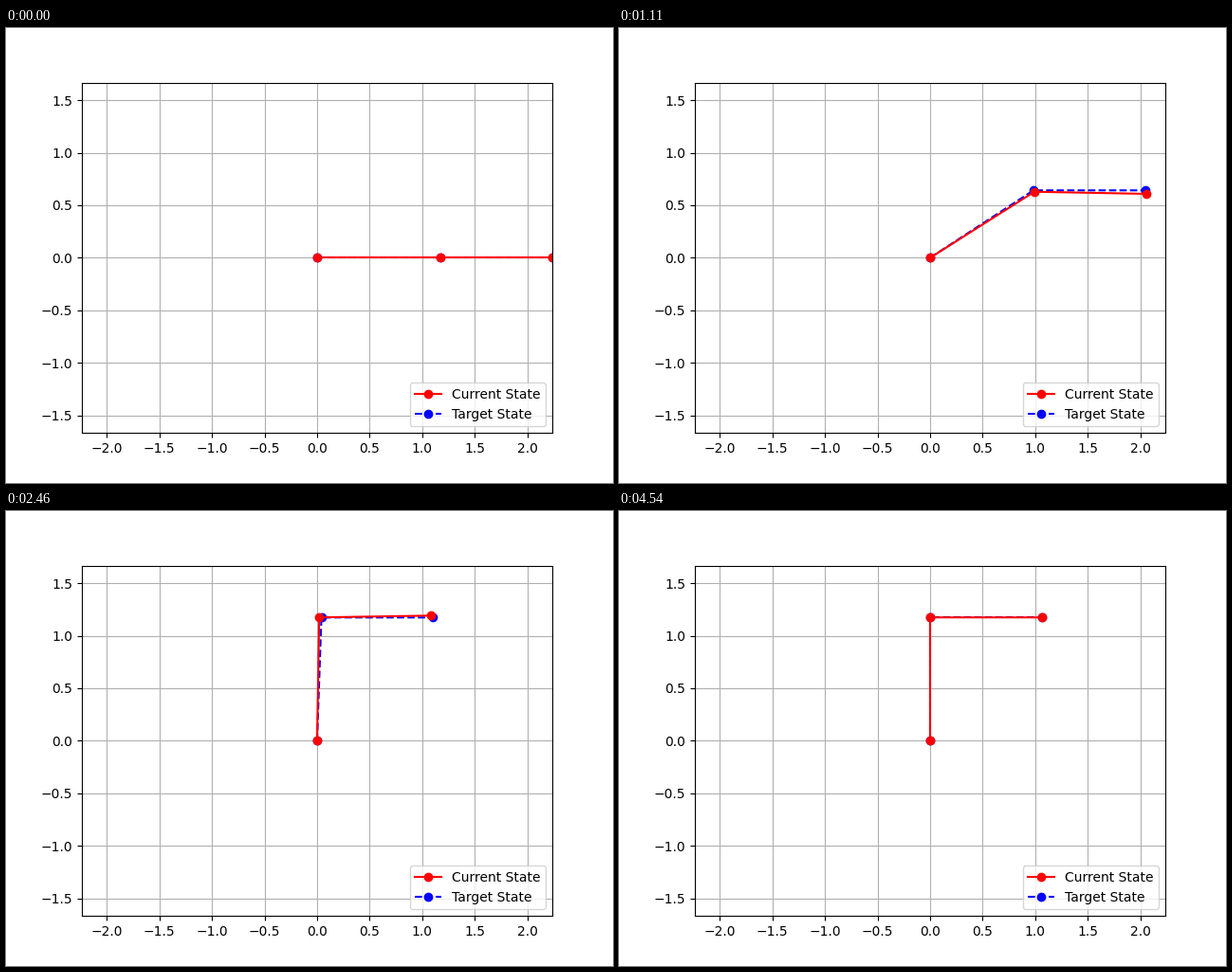
Write a matplotlib script that moves like this. It is 640 px wide and 480 px high and loops after 9.49 s.

```python
import numpy as np
import matplotlib.pyplot as plt
from matplotlib.animation import FuncAnimation

LOOP_MS = 9490
FRAMES = 317
STEP = 0.03              # seconds per frame
MOVE_TIME = 2.7          # length of the planned motion in seconds
L1, L2 = 1.1745, 1.0635  # link lengths
REACH = L1 + L2

STIFFNESS = 5.8                    # controller frequency, critically damped
LOAD = 0.019 * STIFFNESS ** 2      # how strongly inertia disturbs the links
COUPLING = np.array([0.5, 0.9])    # tangential load on each link
CENTRIPETAL = np.array([0.5, 0.1])
SUBSTEPS = 20


def plan(t):
    """Angle, speed and acceleration of the cubic ease from 0 to 90 degrees."""
    if t >= MOVE_TIME:
        return np.pi / 2, 0, 0
    u = t / MOVE_TIME
    angle = np.pi / 2 * u * u * (3 - 2 * u)
    speed = 3 * np.pi * u * (1 - u) / MOVE_TIME
    accel = 3 * np.pi * (1 - 2 * u) / MOVE_TIME ** 2
    return angle, speed, accel


def tracking_errors():
    """Angle errors of both links in every frame, from a damped follower."""
    error, rate = np.zeros(2), np.zeros(2)
    dt = STEP / SUBSTEPS
    rows = []
    for frame in range(FRAMES):
        rows.append(error.copy())
        for sub in range(SUBSTEPS):
            angle, speed, accel = plan(frame * STEP + sub * dt)
            force = (accel * (1 + COUPLING * np.cos(angle))
                     - CENTRIPETAL * speed ** 2 * np.sin(angle))
            rate += dt * (-LOAD * force - 2 * STIFFNESS * rate
                          - STIFFNESS ** 2 * error)
            error += dt * rate
    return rows


def arm(first, second):
    """Joint positions for the absolute angles of both links."""
    x = np.cumsum([0, L1 * np.cos(first), L2 * np.cos(second)])
    y = np.cumsum([0, L1 * np.sin(first), L2 * np.sin(second)])
    return x, y


errors = tracking_errors()

fig, ax = plt.subplots(figsize=(6.4, 4.8), dpi=100)
current, = ax.plot([], [], "ro-", label="Current State", zorder=2.1)
target, = ax.plot([], [], "bo--", label="Target State", zorder=2)
ax.set_xticks(np.arange(-2, 2.1, 0.5))
ax.set_yticks(np.arange(-1.5, 1.6, 0.5))
half_height = REACH * 369.6 / 496
ax.set_xlim(-REACH, REACH)
ax.set_ylim(-half_height, half_height)
ax.grid(True)
ax.legend(loc="lower right")


def update(frame):
    angle = plan(frame * STEP)[0]
    first, second = errors[frame]
    target.set_data(*arm(angle, 0))
    current.set_data(*arm(angle + first, second))
    return target, current


anim = FuncAnimation(fig, update, frames=FRAMES, interval=LOOP_MS / FRAMES,
                     repeat=True, repeat_delay=0)
plt.show()
```
